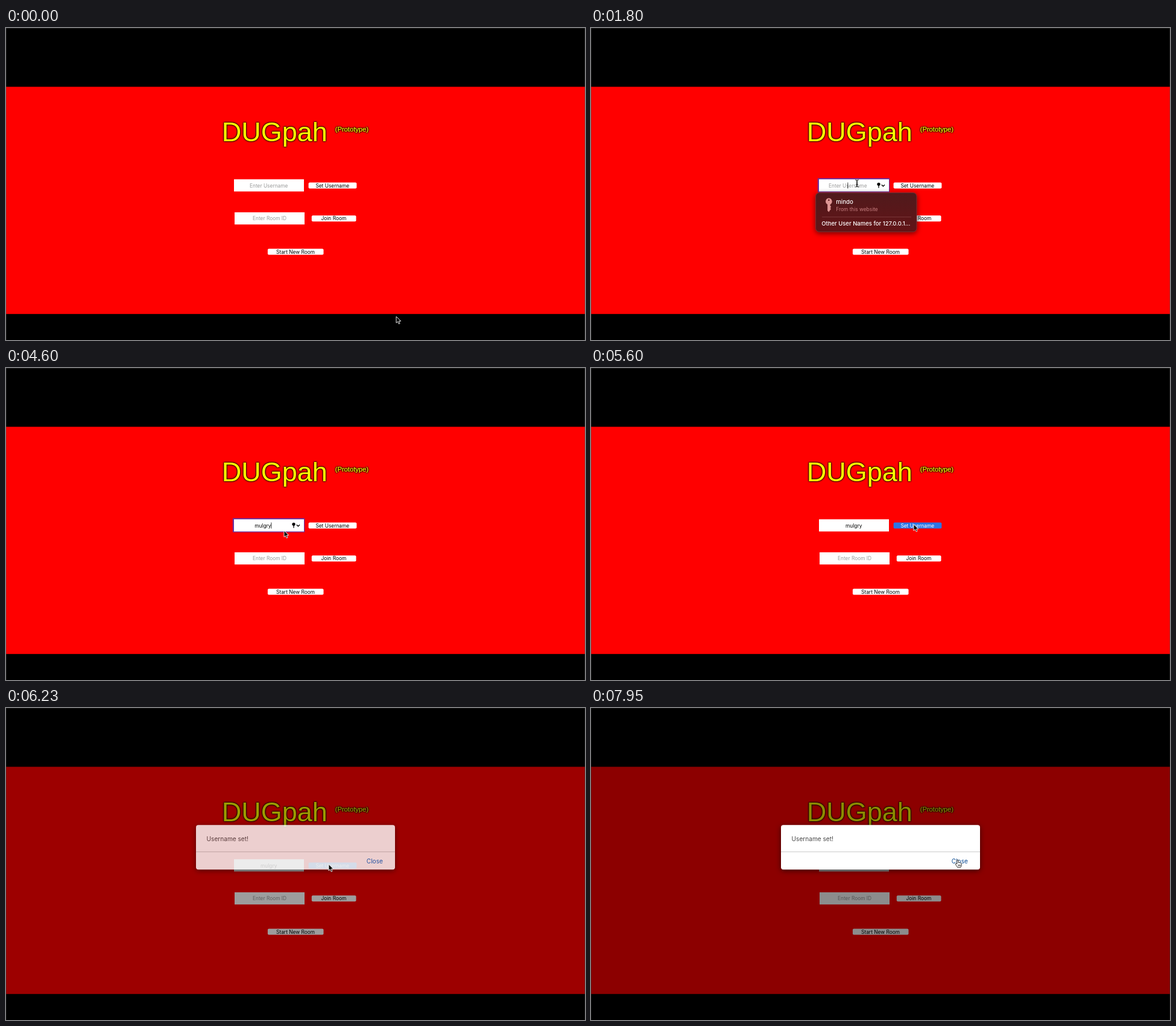
An HTML page that plays this animation: 960x518 px, repeating every 8000 ms.

```html
<!DOCTYPE html>
<html lang="en">
<head>
<meta charset="utf-8">
<title>Room lobby</title>
<style>
  html, body { margin: 0; height: 100%; overflow: hidden; background: #000; }
  svg { display: block; width: 100vw; height: 100vh; font: 8.35px Inter, sans-serif; }
  .title { font-family: "Liberation Sans", Arial, sans-serif; fill: #ff0; filter: drop-shadow(0 0 1px #000) drop-shadow(.5px .8px 1px #000); }
  .small { stroke: #ff0; stroke-width: .2; }
  .mid { text-anchor: middle; }
  .hint { fill: #999; }
  .box { fill: #fff; }
  .bold { font-weight: 500; fill: #fff; }
  .shadow { filter: drop-shadow(0 2px 4px #0009); }
</style>
</head>
<body>
<svg viewBox="0 0 960 518">
  <defs>
    <linearGradient id="glass" x2="0" y2="1">
      <stop stop-color="#501a1c"/>
      <stop offset="1" stop-color="#621417"/>
    </linearGradient>
    <path id="ibeam" d="M-2.8-6Q0-6 0-4.5V4.5Q0 6-2.8 6M2.8-6Q0-6 0-4.5V4.5Q0 6 2.8 6M-1.3 1.6H1.3"/>
  </defs>

  <rect width="960" height="518"/>
  <rect y="97.6" width="960" height="377.2" fill="#f00"/>
  <path d="M0 .5H960M.5 0V518M959.5 0V518" stroke="#555" stroke-opacity=".35"/>

  <text class="title" x="357.8" y="188.2" font-size="45">DUGpah</text>
  <text class="title small" x="545.7" y="172.3" font-size="11.2">(Prototype)</text>

  <rect id="ring" x="375.8" y="249.2" width="119.4" height="23.6" rx="1" fill="#6c2f9c"/>
  <rect class="box" x="378" y="251.2" width="116" height="20.2"/>
  <text id="entry" class="mid" y="264.6"></text>
  <path id="caret" d="M0 256.5v10" stroke="#000" stroke-width=".8"/>
  <g id="icons">
    <circle cx="477" cy="259.3" r="2.6"/>
    <path d="M477 260v5.6M481.8 260.3l2.6 2.5 2.6-2.5" fill="none" stroke="#000" stroke-width="1.3"/>
  </g>
  <rect id="setBox" x="501.6" y="256.4" width="79.8" height="10.1" rx="2"/>
  <text id="setText" class="mid" x="541.3" y="264.6">Set Username</text>

  <rect class="box" x="379" y="306" width="116" height="20.2"/>
  <text class="mid hint" x="437" y="319.3">Enter Room ID</text>
  <rect class="box" x="506.8" y="311.2" width="73.7" height="10.1" rx="2"/>
  <text class="mid" x="543.4" y="319.3">Join Room</text>
  <rect class="box" x="433.9" y="366.5" width="92.6" height="10.1" rx="2"/>
  <text class="mid" x="480" y="374.8">Start New Room</text>

  <g id="popup">
    <rect class="shadow" x="372.5" y="273.5" width="167.5" height="65" rx="6" fill="url(#glass)" stroke="#80383b" stroke-width=".8"/>
    <path d="M394.3 282.5a5.5 5.5 0 0 1 2.3 10.4v2.2l1.6 1.8-1.6 1.8 1.4 1.7-1.7 2-2 3.2-2.2-2.4V292.9a5.5 5.5 0 0 1 2.2-10.4z" fill="#df9694"/>
    <circle cx="394.3" cy="285.8" r="1.3" fill="#5a1518"/>
    <text class="bold" x="406.3" y="292.3" font-size="9.6">mindo</text>
    <text x="406.3" y="304.2" fill="#c97f80">From this website</text>
    <path d="M383 313.8H531" stroke="#854043" stroke-width=".8"/>
    <text class="bold" x="382.2" y="328.2" font-size="9.5">Other User Names for 127.0.0.1...</text>
  </g>

  <rect id="dim" width="960" height="518"/>
  <g id="modal">
    <rect class="box shadow" x="315" y="194.3" width="330" height="74" rx="4"/>
    <path d="M315 238.8H645" stroke="#c8c8c8"/>
    <text x="332.6" y="221.3" font-size="10.1" fill="#484848">Username set!</text>
    <text id="close" x="597.8" y="257.9" font-size="10.1">Close</text>
  </g>

  <g id="cursor" stroke-linejoin="round">
    <path id="arrow" d="M0 0V10.6L2.5 8.4 4.2 12.3 6 11.5 4.4 7.7H7.8z" stroke="#fff" stroke-width=".9"/>
    <g id="beam" fill="none">
      <use href="#ibeam" stroke="#fff" stroke-width="2"/>
      <use href="#ibeam" stroke="#000"/>
    </g>
    <path id="hand" d="M-1.2 7V.8Q0-.8 1.2.8V4.6Q2.4 3.8 3 5 4.2 4.4 4.8 5.6 6 5.2 6.3 6.4V9Q6 11 5 12.4H-.6Q-1.4 10.6-3.6 7.8-4.2 6.4-2.8 6.2zM1 8v2.4M2.7 8v2.4M4.3 8v2.4" fill="#fff" stroke="#000" stroke-width=".8"/>
  </g>
</svg>
<script>
const LOOP = 8000, NAME = "mulgry";
const FOCUS = 1150, POPUP = 1430, PRESS = 5600, MODAL = 6136;
const KEYS = [3450, 3700, 3950, 4150, 4400, 4600];
const BLINK_OFF = [[2200, 2450], [2950, 3200]];
// Mouse waypoints: time, x, y
const MOUSE = [
  [0, 647, 479], [50, 647, 479], [850, 443, 255.5], [900, 443, 255.5], [1000, 441, 258],
  [1800, 441, 258], [1950, 455, 271], [3450, 455, 271], [3550, 461, 270], [4800, 461, 270],
  [5400, 535, 259.5], [6700, 535, 259.5], [7500, 602, 253], [7750, 608, 252], [LOOP, 608, 252]
];
const $ = id => document.getElementById(id);
const clamp = v => Math.min(1, Math.max(0, v));
const set = (id, attrs) => { for (const k in attrs) $(id).setAttribute(k, attrs[k]); };
const show = (id, on) => set(id, { opacity: +on });

function mouseAt(t) {
  const i = MOUSE.findIndex(p => p[0] > t);
  const [t0, x0, y0] = MOUSE[i - 1], [t1, x1, y1] = MOUSE[i];
  const u = (t - t0) / (t1 - t0), e = u * u * (3 - 2 * u);
  return [x0 + (x1 - x0) * e, y0 + (y1 - y0) * e];
}

function drawField(t) {
  const focused = t >= FOCUS && t < PRESS;
  const typed = NAME.slice(0, KEYS.filter(k => t >= k).length);
  const x = focused ? 425.8 : 435.7;
  const entry = $("entry");
  entry.textContent = typed || "Enter Username";
  set("entry", { x, fill: typed ? "#000" : "#999" });
  const caretX = x + (typed ? entry.getComputedTextLength() / 2 + .4 : 0);
  set("caret", { transform: `translate(${caretX})` });
  show("caret", focused && !BLINK_OFF.some(([a, b]) => t >= a && t < b));
  show("ring", focused ? clamp((t - FOCUS + 50) / 150) : 0);
  show("icons", focused);
  show("popup", clamp((t - POPUP) / 70) * (1 - clamp((t - KEYS[0]) / 200)));
}

function drawModal(t) {
  const p = 1 - (1 - clamp((t - MODAL) / 250)) ** 4;
  const pressed = t >= PRESS;
  set("setBox", { fill: pressed ? "#2c76e4" : "#fff" });
  set("setText", { fill: pressed ? "#fff" : "#000" });
  show("dim", .45 * p);
  show("modal", p ** 1.3);
  set("close", { fill: t >= 7950 ? "#0a4c94" : "#0b68c8" });
}

function drawCursor(t) {
  const [x, y] = mouseAt(t);
  const beam = t < MODAL && x > 378 && x < 494 && y > 251 && y < 266;
  const hand = t > MODAL && x > 597;
  set("cursor", { transform: `translate(${x} ${y})` });
  show("beam", beam);
  show("hand", hand);
  show("arrow", !beam && !hand);
}

const start = performance.now();
function frame(now) {
  const t = Math.max(0, now - start) % LOOP;
  drawField(t);
  drawModal(t);
  drawCursor(t);
  requestAnimationFrame(frame);
}
frame(start);
</script>
</body>
</html>
```
